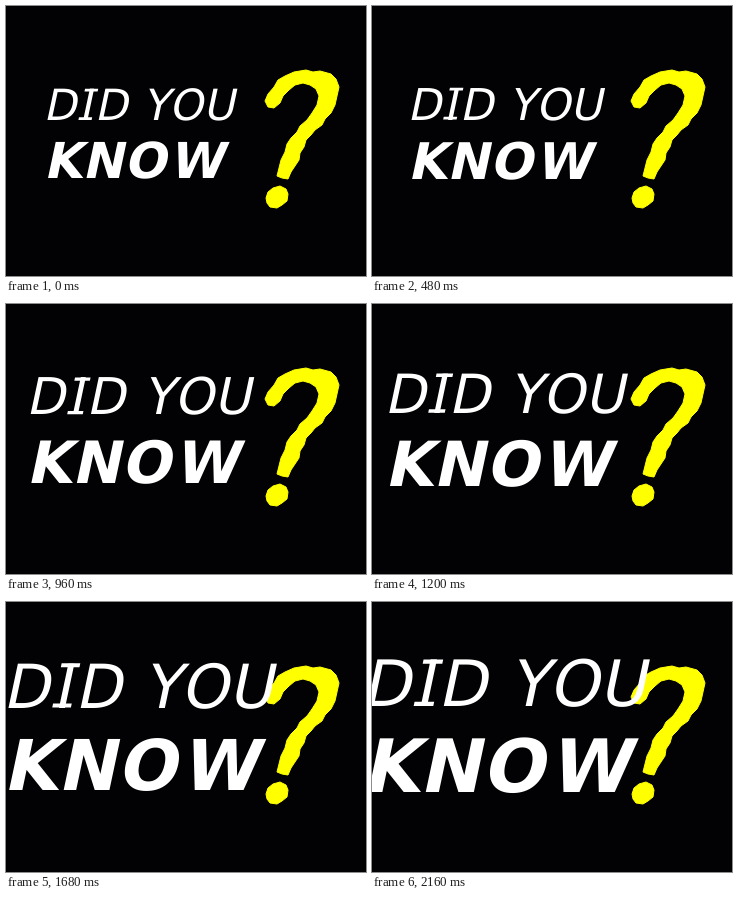
These frames come from a looping animation (360x270 px, 2.22 s). An HTML page:

```html
<!DOCTYPE html>
<html lang="en">
<head>
<meta charset="utf-8">
<title>Did you know?</title>
<style>
  html, body { margin: 0; width: 100%; height: 100%; overflow: hidden; background: #020104; }
  svg { display: block; width: 100%; height: 100%; }
  text { font-family: "DejaVu Sans", sans-serif; }
  .light { font-size: 43px; }
  .bold { font-size: 49.5px; font-weight: bold; }
</style>
</head>
<body>
<svg viewBox="0 0 360 270">
  <g fill="#ff0" stroke="#ff0" stroke-linejoin="round">
    <path d="M259 95L262 88L268 81L272 74L279 70L288 66L300 64L307 66L314 65L325 68L330 73L333 81L331 90L329 99L325 107L319 113L316 119L309 124L305 129L300 134L298 141L294 147L293 154L289 160L285 166L282 173L276 172L271 170L273 162L275 154L279 146L281 138L285 132L291 126L294 120L301 114L306 107L311 99L313 90L310 83L304 79L297 77L289 79L283 84L277 90L274 97L268 102L262 101Z"/>
    <path d="M260 192L262 186L267 182L274 180L280 183L282 188L281 195L276 199L271 202L264 201L261 197Z"/>
  </g>
  <g id="words" fill="#fff">
    <!-- Each line is slanted about its own baseline. -->
    <g transform="translate(0 114) skewX(-12)">
      <text class="light" x="37.2 73 88.4 121.5 136.7 163.1 196.9">DID YOU</text>
      <path d="M72.4 -2.8h13.2v2.8h-13.2zM72.4 -31.3h13.2v2.8h-13.2z"/>
    </g>
    <g transform="translate(0 172) skewX(-12)">
      <text class="bold" x="37.5 76 118 163">KNOW</text>
    </g>
  </g>
</svg>
<script>
  const LOOP = 2220, STEP = 60;
  const GROW_START = 420, GROW_END = 1900, MAX_SCALE = 1.487;
  const CENTER_X = 135.5, CENTER_Y = 134.5;
  const words = document.getElementById("words");

  function draw() {
    const time = Math.floor((performance.now() % LOOP) / STEP) * STEP;
    const progress = Math.min(1, Math.max(0, (time - GROW_START) / (GROW_END - GROW_START)));
    const scale = 1 + (MAX_SCALE - 1) * progress;
    words.setAttribute("transform",
      `translate(${CENTER_X} ${CENTER_Y}) scale(${scale}) translate(${-CENTER_X} ${-CENTER_Y})`);
    requestAnimationFrame(draw);
  }
  draw();
</script>
</body>
</html>
```
